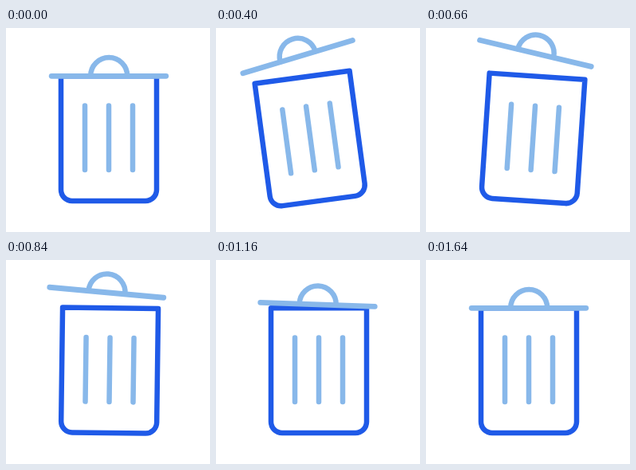
Animation, 256 px wide and 256 px high, one loop 1660 ms. Source, as an HTML page:

```html
<!DOCTYPE html>
<html lang="en">
<head>
<meta charset="utf-8">
<title>Trash can</title>
<style>
  html, body { margin: 0; width: 100%; height: 100%; overflow: hidden; background: #fff; }
  svg { display: block; width: 100vw; height: 100vh; }
  path { fill: none; stroke-width: 6.5; stroke-linecap: round; stroke-linejoin: round; }
  .dark { stroke: #1f5ae8; }
  .light { stroke: #88b8ea; }
  .rim { stroke-width: 6.8; }
</style>
</head>
<body>
<svg viewBox="0 0 256 256">
  <g id="can">
    <path class="dark" d="M69 60.3H189V203a14 14 0 0 1-14 14H83a14 14 0 0 1-14-14Z"/>
    <path class="light" d="M99 97.5V178M129 97.5V178M159 97.5V178"/>
    <g id="lid">
      <path class="light" d="M106.2 60a23 23 0 0 1 46 0"/>
      <path class="light rim" d="M57.2 60.3H200.8"/>
    </g>
  </g>
</svg>
<script>
  const LOOP = 1660, STEP = 20;

  // Each track lists [time in ms, value].
  const tracks = {
    sway:  [[0, 0], [160, -9.15], [210, -9.4], [400, -7.66], [580, 4.4], [660, 3.85], [840, .75], [960, 0]],
    tilt:  [[0, 0], [160, -9.55], [210, -9.8], [400, -9.04], [580, 10], [660, 9.5], [840, 4.45], [1160, 2], [1640, 0]],
    lift:  [[0, 0], [160, 13], [400, 26], [540, 31], [660, 28.6], [840, 19.5], [1080, 7], [1160, 4.5], [1640, 0]],
    slide: [[0, 0], [160, -2], [400, -2.1], [660, -4], [840, -5], [1160, -1.5], [1640, 0]]
  };

  const slope = (a, b) => (b[1] - a[1]) / (b[0] - a[0]);

  // Tangent that never overshoots and is flat at peaks and at both ends.
  function tangent(keys, i) {
    if (i === 0 || i === keys.length - 1) return 0;
    const before = slope(keys[i - 1], keys[i]), after = slope(keys[i], keys[i + 1]);
    return before * after > 0 ? 2 * before * after / (before + after) : 0;
  }

  function sample(keys, time) {
    const i = keys.findIndex(key => key[0] > time) - 1;
    if (i < 0) return keys[keys.length - 1][1];
    const [t0, v0] = keys[i], [t1, v1] = keys[i + 1];
    const span = t1 - t0, u = (time - t0) / span, w = 1 - u;
    return v0 * w * w * (1 + 2 * u) + v1 * u * u * (3 - 2 * u)
      + span * u * w * (w * tangent(keys, i) - u * tangent(keys, i + 1));
  }

  const can = document.getElementById('can');
  const lid = document.getElementById('lid');

  function draw(elapsed) {
    const time = Math.floor(elapsed % LOOP / STEP) * STEP;
    const at = name => sample(tracks[name], time);
    can.setAttribute('transform', `rotate(${at('sway')} 129 217)`);
    lid.setAttribute('transform', `translate(${at('slide')} ${-at('lift')}) rotate(${at('tilt')} 129 60)`);
  }

  const start = performance.now();
  function tick() {
    draw(performance.now() - start);
    requestAnimationFrame(tick);
  }
  tick();
</script>
</body>
</html>
```
